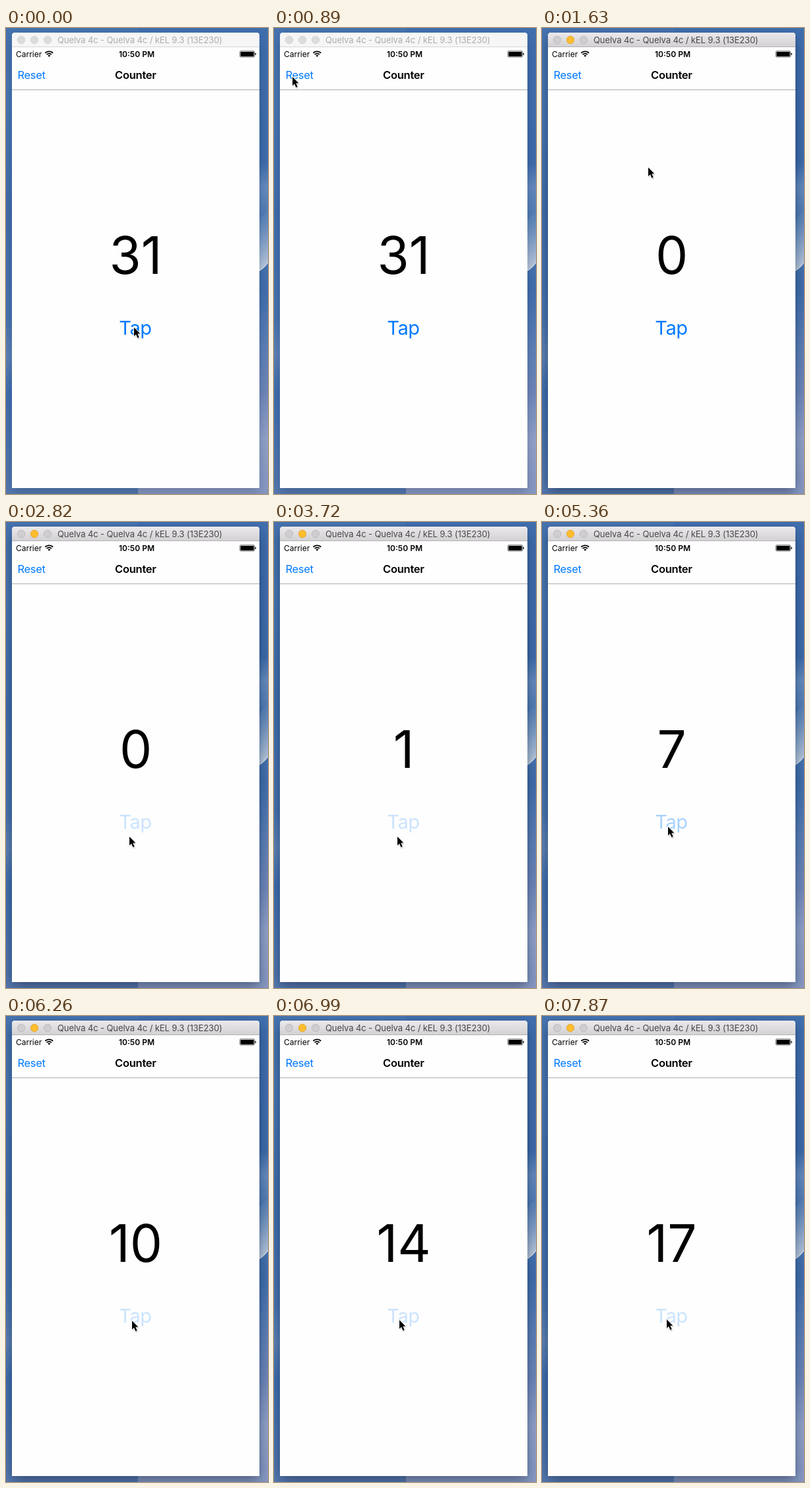
Write an HTML page that moves like this. It is 397 px wide and 705 px high and loops after 8 s.

```html
<!DOCTYPE html>
<html lang="en">
<head>
<meta charset="utf-8">
<title>Counter</title>
<style>
  html, body { margin: 0; width: 100%; height: 100%; overflow: hidden; background: #4470ad; }
  svg { display: block; width: 397px; height: 705px; }
  text { font-family: Inter, Roboto, sans-serif; }
  .mid { text-anchor: middle; }
  .bold { font-weight: 600; }
  .link { fill: #007aff; }
</style>
</head>
<body>
<svg viewBox="0 0 397 705">
  <defs>
    <linearGradient id="left" x2="0" y2="1">
      <stop offset="0" stop-color="#4673ae"/>
      <stop offset=".15" stop-color="#4a78b4"/>
      <stop offset=".4" stop-color="#426fae"/>
      <stop offset=".62" stop-color="#4a75b1"/>
      <stop offset=".7" stop-color="#6083b8"/>
      <stop offset=".78" stop-color="#416fb0"/>
      <stop offset="1" stop-color="#5679b0"/>
    </linearGradient>
    <linearGradient id="right" x2="0" y2="1">
      <stop offset="0" stop-color="#416fae"/>
      <stop offset=".29" stop-color="#3f6dac"/>
      <stop offset=".34" stop-color="#668bbf"/>
      <stop offset=".42" stop-color="#4e7ab4"/>
      <stop offset=".56" stop-color="#426fae"/>
      <stop offset=".68" stop-color="#5d80b8"/>
      <stop offset=".78" stop-color="#7088bb"/>
      <stop offset=".88" stop-color="#93a3ca"/>
      <stop offset="1" stop-color="#8798c2"/>
    </linearGradient>
    <linearGradient id="moon" x2="0" y2="1">
      <stop offset="0" stop-color="#b9c9de" stop-opacity="0"/>
      <stop offset="1" stop-color="#c3d0e1"/>
    </linearGradient>
    <linearGradient id="bar" x2="0" y2="1">
      <stop offset="0" stop-color="#ebe9eb"/>
      <stop offset="1" stop-color="#d2d0d2"/>
    </linearGradient>
    <filter id="blur" x="-20%" y="-20%" width="140%" height="140%">
      <feGaussianBlur stdDeviation="9"/>
    </filter>
    <filter id="soft" x="-50%" y="-50%" width="200%" height="200%">
      <feGaussianBlur stdDeviation=".8"/>
    </filter>
    <path id="arrow" d="M0 0V13.2L3 10.4L5.4 16L7.7 15L5.3 9.6H9.4Z"/>
  </defs>

  <!-- desktop -->
  <rect width="200" height="705" fill="url(#left)"/>
  <rect x="200" width="197" height="705" fill="url(#right)"/>
  <path d="M384 290L397 275V353Q392 362 384 367Z" fill="url(#moon)"/>
  <path d="M384 367Q392 362 397 354" fill="none" stroke="#d3dce8" stroke-width="1.5"/>
  <rect id="shade" x="9" y="16" width="375" height="686" rx="5" fill="#0a1a38" filter="url(#blur)"/>

  <!-- window -->
  <path d="M9 696V11.5Q9 7 13.5 7H379.5Q384 7 384 11.5V696Z" fill="#fefefe"/>
  <path id="titlebar" d="M9 29V11.5Q9 7 13.5 7H379.5Q384 7 384 11.5V29Z"/>
  <path id="edge" d="M9 28.5H384"/>
  <g id="lights">
    <circle cx="23" cy="18" r="5.7"/>
    <circle cx="43" cy="18" r="5.7"/>
    <circle cx="63" cy="18" r="5.7"/>
  </g>
  <text id="title" x="78" y="23" font-size="13" letter-spacing="-.1">Quelva 4c - Quelva 4c / kEL 9.3 (13E230)</text>

  <!-- status bar -->
  <text x="15" y="43.5" font-size="12">Carrier</text>
  <g fill="none" stroke="#000" stroke-width="1.9">
    <path d="M59.4 37.8A8.4 8.4 0 0 1 71.2 37.8"/>
    <path d="M61.7 40.2A5.1 5.1 0 0 1 68.9 40.2"/>
  </g>
  <path d="M65.3 43.8L63.3 41.8A2.8 2.8 0 0 1 67.3 41.8Z"/>
  <text class="mid bold" x="198" y="43.5" font-size="12">10:50 PM</text>
  <rect x="354.3" y="34.8" width="22.4" height="9.2" rx="1.8" fill="none" stroke="#000" stroke-width=".6"/>
  <rect x="355.4" y="35.9" width="20.2" height="7" rx=".8"/>
  <path d="M377.5 37.6Q379 38.2 379 39.4T377.5 41.2Z"/>

  <!-- navigation and content -->
  <text id="reset" class="link" x="17.5" y="77" font-size="16.5" letter-spacing="-.35">Reset</text>
  <text class="mid bold" x="196.3" y="77" font-size="16.5" letter-spacing="-.25">Counter</text>
  <path d="M9 93.5H384" stroke="#b0b0b2"/>
  <text id="count" class="mid" x="196.5" y="372" font-size="78"></text>
  <text id="tap" class="link mid" x="196" y="464" font-size="29" letter-spacing="-.4">Tap</text>

  <g id="cursor">
    <use href="#arrow" x=".6" y="1.4" opacity=".45" filter="url(#soft)"/>
    <use href="#arrow" stroke="#fff" stroke-width="1.8" stroke-linejoin="round"/>
    <use href="#arrow"/>
  </g>
</svg>
<script>
const LOOP = 8000, STEP = 148.6, LEAD = 9;
const CLICK = 8;          // step at which Reset is pressed
const FADE = [.33, .7];   // label opacity after a release

const releases = [20, 26, 29, 31, 33, 35, 36, 38, 40, 41, 44, 45, 46, 47, 49, 51, 53];
const held = new Set([19, 25, 28, 30, 32, 34, 37, 39, 42, 43, 47, 48, 50, 51, 52, 53]);

// step, x, y of the pointer tip
const path = [
  [0, 194, 453], [1, 193, 453], [2, 193, 453], [3, 178, 418], [4, 112, 262],
  [5, 48, 112], [6, 28, 74], [9, 28, 74], [10, 78, 122], [11, 161, 211],
  [12, 186, 316], [13, 190, 410], [14, 187, 462], [15, 187, 476], [25, 187, 476],
  [26, 191, 461], [43, 191, 461], [44, 190, 460], [48, 190, 460], [49, 189, 459],
  [54, 189, 459]
];

const $ = id => document.getElementById(id);
const set = (el, attrs) => {
  for (const key in attrs) el.setAttribute(key, attrs[key]);
};

function pointerAt(n) {
  const i = path.findIndex(p => p[0] >= n);
  if (i <= 0) return path[0].slice(1);
  const [a, ax, ay] = path[i - 1], [b, bx, by] = path[i];
  const k = (n - a) / (b - a);
  return [ax + (bx - ax) * k, ay + (by - ay) * k];
}

function tapOpacity(n, last) {
  if (held.has(n)) return .2;
  return last === undefined ? 1 : FADE[n - last] ?? 1;
}

function drawChrome(active) {
  set($('shade'), { opacity: active ? .5 : .28 });
  set($('titlebar'), { fill: active ? 'url(#bar)' : '#f6f6f6' });
  set($('edge'), { stroke: active ? '#b5b3b5' : '#d6d6d6' });
  set($('title'), { fill: active ? '#484648' : '#adadad' });
  [...$('lights').children].forEach((light, i) => {
    const amber = active && i === 1;
    set(light, {
      fill: amber ? '#fdbd2f' : active ? '#cfcdd0' : '#dcdcdc',
      stroke: amber ? '#dfa02c' : active ? '#b7b5b8' : '#d0d0d0',
      'stroke-width': .8
    });
  });
}

function render(time) {
  const n = Math.floor((time % LOOP + LEAD) / STEP);
  const done = releases.filter(r => r <= n);
  drawChrome(n >= CLICK);
  $('count').textContent = n > CLICK ? done.length : 31;
  set($('tap'), { opacity: tapOpacity(n, done[done.length - 1]) });
  set($('reset'), { opacity: n === CLICK ? .2 : FADE[n - CLICK - 1] ?? 1 });
  set($('cursor'), { transform: `translate(${pointerAt(n)})` });
}

function tick() {
  render(performance.now());
  requestAnimationFrame(tick);
}
tick();
</script>
</body>
</html>
```
